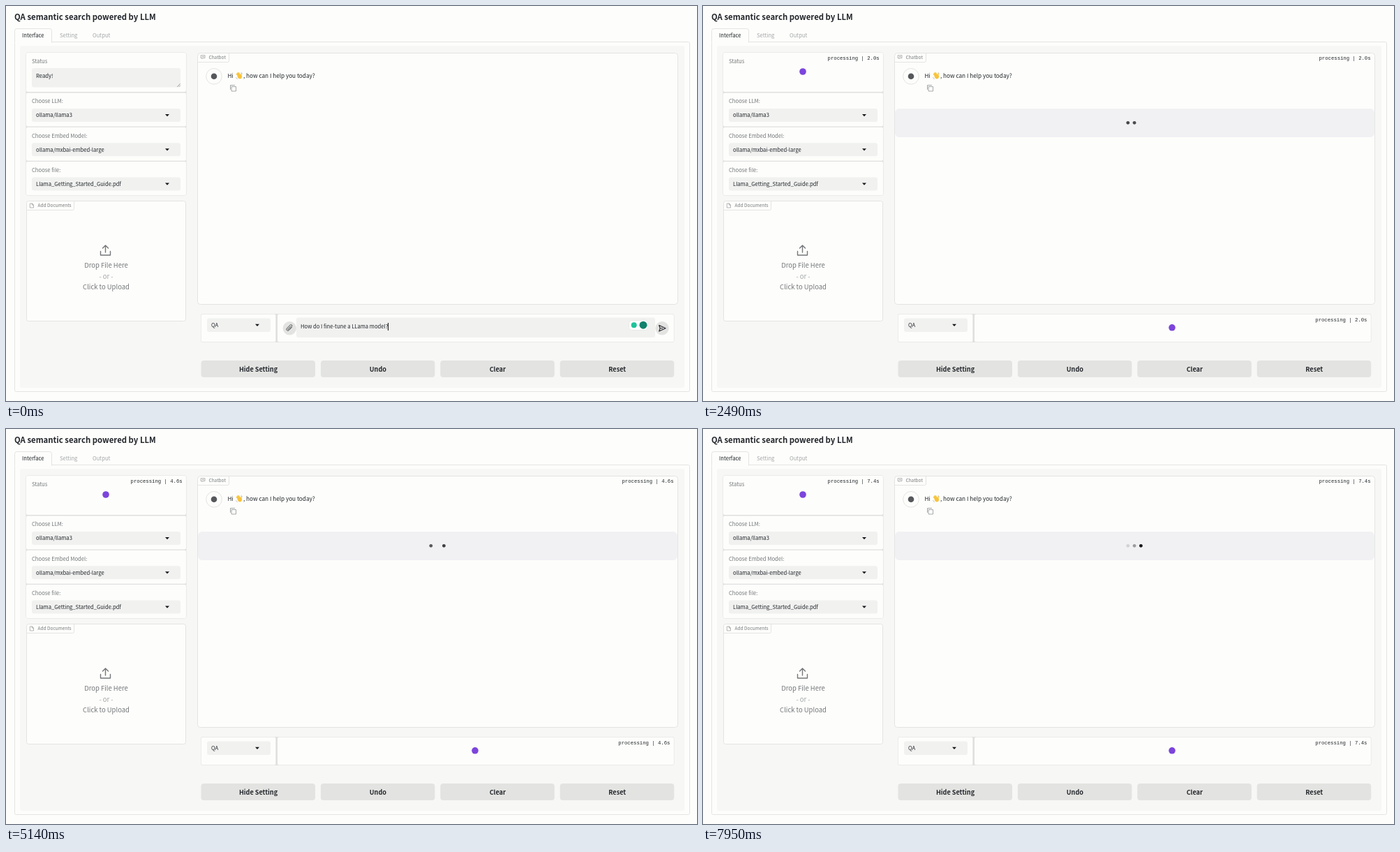
An HTML page that plays this animation: 990 px wide and 566 px high, repeating every 7.99 s.

```html
<!DOCTYPE html>
<html lang="en">
<head>
<meta charset="utf-8">
<title>QA semantic search</title>
<style>
  html, body { margin: 0; width: 100%; height: 100%; overflow: hidden; background: #fdfefb; }
  svg { display: block; width: 990px; height: 566px; }
  text { font: 7.65px "Noto Sans CJK SC", "Noto Sans CJK JP", "Noto Sans CJK", "Open Sans", sans-serif; fill: #22252b; white-space: pre; }
  .label { fill: #74767a; }
  .muted { fill: #a3a5a8; }
  .tag { font-size: 6.5px; fill: #74767a; }
  .title { font-size: 11.35px; font-weight: 700; }
  .button { font-size: 9.1px; font-weight: 700; }
  .drop { font-size: 9.45px; }
  .chat { font-size: 8.2px; }
  .timer { font: 7.27px "Liberation Mono", "DejaVu Sans Mono", monospace; }
  .middle { text-anchor: middle; }
  .end { text-anchor: end; }
  .icon { fill: none; stroke-linecap: round; stroke-linejoin: round; }
</style>
</head>
<body>
<svg id="stage" viewBox="0 0 990 566"></svg>
<script>
const LOOP = 7990;
const CARET_OFF = 110;
const PENDING_AT = 360;
const TIMER_ZERO = 510;
const FLASH_ZERO = 830;

const PAPER = '#fdfefb', PANEL = '#f7f8f5', FIELD = '#f1f2f0', LINE = '#e4e5e3', ACCENT = '#7c45dc';

const rect = (x, y, w, h, fill, radius = 0, stroke = 'none') =>
  `<rect x="${x}" y="${y}" width="${w}" height="${h}" rx="${radius}" fill="${fill}" stroke="${stroke}"/>`;
const card = (x, y, w, h, radius = 3) => rect(x + .5, y + .5, w - 1, h - 1, PAPER, radius, LINE);
const circle = (x, y, r, fill, extra = '') => `<circle cx="${x}" cy="${y}" r="${r}" fill="${fill}" ${extra}/>`;
const text = (x, y, content, style = '') => `<text x="${x}" y="${y}" class="${style}">${content}</text>`;
const icon = (d, color, width = 1) => `<path class="icon" d="${d}" stroke="${color}" stroke-width="${width}"/>`;
const arrow = (x, y) => `<path d="M${x - 3} ${y - 1.5}h6l-3 3.2z" fill="#17191c"/>`;
const timer = (x, y) => text(x, y, '', 'timer end');
const spinner = (x, y) => circle(x, y, 4.8, ACCENT);

function dropdown(y, label, value) {
  return rect(29, y, 229, 48, PAPER, 2) + text(37, y + 14.8, label, 'label') +
    rect(37, y + 22.5, 213, 19, FIELD, 3) + text(43, y + 34.8, value) + arrow(231, y + 32);
}

function tag(x, y, w, label) {
  return `<path d="M${x} ${y + 13.5}h${w - 2}q2 0 2-2v-11.5" fill="none" stroke="${LINE}"/>` +
    text(x + 16, y + 9.2, label, 'tag');
}

function button(x, label) {
  return rect(x, 508, 163.5, 24, '#e3e4e1', 4) + text(x + 82, 523.9, label, 'button middle');
}

function frameAndTabs() {
  return rect(12.5, 51.5, 967, 501, PAPER, 2, LINE) +
    rect(20, 57, 952, 490, PANEL, 3) +
    `<path d="M12.5 52.5v-17q0-3 3-3h47q3 0 3 3v17" fill="${PAPER}" stroke="${LINE}"/>` +
    rect(13, 51, 52, 2, PAPER) +
    text(12, 20.2, 'QA semantic search powered by LLM', 'title') +
    text(23, 44.8, 'Interface') +
    text(77, 44.8, 'Setting', 'muted') +
    text(124, 44.8, 'Output', 'muted');
}

function sidebar() {
  return rect(28.5, 66.5, 230, 205, '#dfe0df', 3) +
    rect(29, 67, 229, 56, PAPER, 2) +
    text(37, 81.5, 'Status', 'label') +
    dropdown(124.5, 'Choose LLM:', 'ollama/llama3') +
    dropdown(173.7, 'Choose Embed Model:', 'ollama/mxbai-embed-large') +
    dropdown(223, 'Choose file:', 'Llama_Getting_Started_Guide.pdf') +
    card(29, 279, 229, 173) +
    tag(29.5, 279, 68, 'Add Documents') +
    icon('M34.7 283h2.8l2 2v4h-4.8zM37.4 283v2.2h2', '#85878a', .6) +
    icon('M142.5 353v-10M138.5 347l4-4 4 4M135.5 351.500v5.500h14v-5.500', '#74767a', 1.4) +
    text(143.5, 374.6, 'Drop File Here', 'label drop middle') +
    text(143.5, 390.5, '- or -', 'muted drop middle') +
    text(143.5, 406.2, 'Click to Upload', 'label drop middle');
}

function wavingHand() {
  return icon('M332.500 100l-2-2.500M333.500 99l-2-3M335 98.500l-1.700-2.800M336.500 101l.6-4', '#f8c33b', 1.5) +
    `<ellipse cx="335" cy="101.200" rx="3.200" ry="3" fill="#f8c33b" transform="rotate(40 335 101)"/>` +
    icon('M329.500 102.500q.5 1.500 2 2M337 95.500q1.300.4 1.500 1.500', '#9a9c9e', .6);
}

function chat() {
  return card(274, 67, 689, 361, 4) +
    tag(274.5, 67, 45, 'Chatbot') +
    icon('M279.500 70.700h5.500v3.800h-3l-1.200 1v-1h-1.300zM281 72.500h2.500', '#85878a', .6) +
    circle(298, 100.8, 11.3, PAPER, `stroke="${LINE}"`) +
    circle(298, 100.8, 4.3, '#55575a') +
    text(317.5, 103.2, 'Hi', 'chat') + wavingHand() +
    text(340, 103.2, ', how can I help you today?', 'chat') +
    icon('M323.500 115.500h6v6.500h-6zM321.500 119.500v-6h6', '#909295', .8);
}

function footer() {
  return rect(279, 441, 678.5, 41, LINE, 3) +
    rect(279.7, 441.7, 107, 39.6, PAPER, 2) + rect(389, 441.7, 567.8, 39.6, PAPER, 2) +
    rect(386.5, 441, 2.5, 41, '#dfe0df') +
    rect(288, 447.5, 91, 19.5, FIELD, 3) +
    text(294, 460.2, 'QA') + arrow(360, 457.2) +
    ['Hide Setting', 'Undo', 'Clear', 'Reset'].map((label, i) => button(279.5 + i * 171.4, label)).join('');
}

function idleFields() {
  return rect(37, 89, 213, 27.5, FIELD, 3) + text(43, 103.1, 'Ready!') +
    icon('M245.500 115.500l4-4M248 115.500l1.500-1.500', '#77797c', .7) +
    rect(416, 446.5, 514, 28.5, FIELD, 3) +
    text(422, 462.2, 'How do I fine-tune a LLama model?') +
    '<path id="caret" d="M547.500 454v11" stroke="#111"/>' +
    circle(406.3, 461.8, 9.7, '#e3e4e1') +
    icon('M409.500 460.500l-4.200 4.200a2 2 0 0 1-2.900-2.900l4.800-4.800a1.500 1.500 0 0 1 2.200 2.200l-4.400 4.400a.7.7 0 0 1-1-1l3.700-3.700', '#33363a', .8) +
    circle(940, 461.8, 9.7, '#e3e4e1') +
    icon('M935.700 457.500l9.300 4.300-9.300 4.300 1.400-4.300zM937.100 461.800h3.500', '#22252b', 1.1) +
    rect(892.5, 450.5, 27, 14, '#fff', 4, '#e8e9e7') +
    circle(899.7, 457.2, 4, '#20c39b') + circle(913, 457.2, 5.5, '#11816b');
}

function pendingFields() {
  return rect(275, 147, 687, 41, '#f1f1f4', 6) +
    [608.8, 618.1, 627.4].map(x => circle(x, 167.3, 2.4, '#101114', 'data-dot')).join('') +
    spinner(143, 94) + spinner(672, 460.8) +
    timer(252.7, 77) + timer(956.6, 77) + timer(951.4, 451.7);
}

const stage = document.getElementById('stage');
stage.innerHTML = frameAndTabs() + sidebar() + chat() + footer() +
  `<g id="idle">${idleFields()}</g><g id="pending">${pendingFields()}</g>`;

const idle = document.getElementById('idle');
const pending = document.getElementById('pending');
const caret = document.getElementById('caret');
const dots = stage.querySelectorAll('[data-dot]');
const timers = stage.querySelectorAll('.timer');

const show = (node, visible) => node.setAttribute('visibility', visible ? 'visible' : 'hidden');

// Opacity rises and falls once per second with an eased ramp.
function flash(seconds) {
  const phase = seconds - Math.floor(seconds);
  const ramp = 1 - Math.abs(2 * phase - 1);
  return (1 - Math.cos(Math.PI * ramp)) / 2;
}

function render(time) {
  const busy = time >= PENDING_AT;
  show(idle, !busy);
  show(pending, busy);
  show(caret, time < CARET_OFF);
  const elapsed = Math.max(0, time - TIMER_ZERO) / 1000;
  timers.forEach(node => node.textContent = `processing | ${elapsed.toFixed(1)}s`);
  dots.forEach((dot, i) => dot.setAttribute('opacity', flash((time - FLASH_ZERO) / 1000 - i * .33)));
}

const start = performance.now();
function tick() {
  render((performance.now() - start) % LOOP);
  requestAnimationFrame(tick);
}
tick();
</script>
</body>
</html>
```
